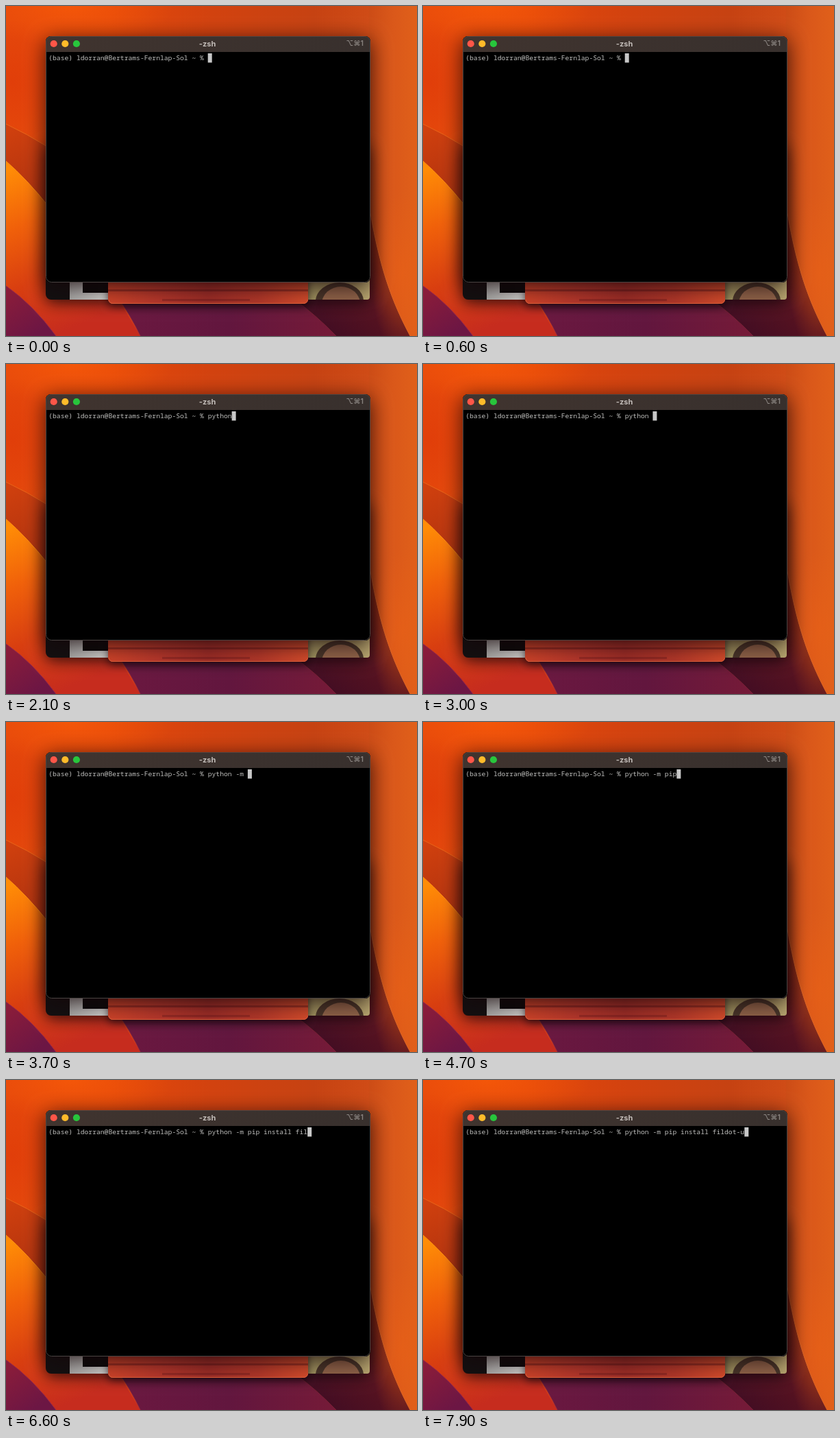
These frames come from a looping animation (600 by 481 pixels, 8000 ms). An HTML page with a canvas:

```html
<!DOCTYPE html>
<html lang="en">
<head>
<meta charset="utf-8">
<title>Terminal</title>
<style>
html, body { margin: 0; width: 100%; height: 100%; overflow: hidden; background: #000; }
canvas { display: block; }
</style>
</head>
<body>
<canvas id="stage" width="600" height="481"></canvas>
<script>
const W = 600, H = 481, LOOP = 8000;
const ctx = document.getElementById('stage').getContext('2d');
const scene = document.createElement('canvas');
scene.width = W;
scene.height = H;
const g = scene.getContext('2d');

const PROMPT = '(base) ldorran@Bertrams-Fernlap-Sol ~ % ';
const COMMAND = 'python -m pip install fildot-u';
// One keystroke time in ms for each character of the command
const KEYS = [
  1000, 1200, 1400, 1500, 1700, 1800, 2400,
  3100, 3300, 3500, 4200, 4400, 4600,
  5000, 5100, 5200, 5300, 5400, 5500, 5600, 5700, 5900,
  6200, 6400, 6600, 6900, 7100, 7300, 7500, 7700
];
const CELL = 5.82, LEFT = 62.2, BASE = 79;

function linear(x0, y0, x1, y1, ...stops) {
  const grad = g.createLinearGradient(x0, y0, x1, y1);
  stops.forEach((c, i) => grad.addColorStop(i / (stops.length - 1), c));
  return grad;
}

function glow(x, y, rx, ry, rgb, alpha) {
  g.save();
  g.translate(x, y);
  g.scale(rx, ry);
  const grad = g.createRadialGradient(0, 0, 0, 0, 0, 1);
  grad.addColorStop(0, `rgba(${rgb},${alpha})`);
  grad.addColorStop(0.5, `rgba(${rgb},${alpha * 0.5})`);
  grad.addColorStop(1, `rgba(${rgb},0)`);
  g.fillStyle = grad;
  g.fillRect(-1, -1, 2, 2);
  g.restore();
}

function shape(d, fill) {
  g.fillStyle = fill;
  g.fill(new Path2D(d));
}

function edge(d, color, width = 1) {
  g.strokeStyle = color;
  g.lineWidth = width;
  g.stroke(new Path2D(d));
}

function box(x, y, w, h, fill) {
  g.fillStyle = fill;
  g.fillRect(x, y, w, h);
}

function panel(x, y, w, h, radius, fill) {
  g.fillStyle = fill;
  g.beginPath();
  g.roundRect(x, y, w, h, radius);
  g.fill();
}

function ellipse(x, y, rx, ry, fill) {
  g.fillStyle = fill;
  g.beginPath();
  g.ellipse(x, y, rx, ry, 0, 0, 7);
  g.fill();
}

function shadowed(color, blur, dy, draw) {
  g.save();
  g.shadowColor = color;
  g.shadowBlur = blur;
  g.shadowOffsetY = dy;
  draw();
  g.restore();
}

function drawWallpaper() {
  box(0, 0, W, H, linear(0, 0, W, 0, '#e5480c', '#e4480a', '#d2420f', '#c64212', '#d8541a'));
  glow(95, 0, 150, 60, '250,92,8', 0.7);
  glow(10, 110, 80, 90, '222,56,8', 0.6);

  // Left folds
  shape('M0 172Q30 186 62 206V481H0Z', linear(0, 180, 50, 290, '#d0400e', '#ac300e'));
  edge('M0 172Q30 186 62 206', '#ea6418');
  shape('M0 226Q30 252 62 292L165 428L196 481H0Z',
    linear(0, 240, 95, 470, '#ff8c06', '#f0600a', '#d83e10', '#c62c1e'));
  edge('M0 226Q30 252 62 292', '#ff9010');
  shape('M0 408Q40 436 73 481H0Z', linear(0, 420, 40, 481, '#8a1c3a', '#6c1644'));
  edge('M0 408Q40 436 73 481', '#96264a');

  // Bottom folds
  shape('M160 420H440L482 481H196Q182 452 160 420Z', linear(180, 0, 470, 0, '#6a1840', '#62163e', '#741a38'));
  edge('M165 428Q182 452 196 481', '#a42c38');
  shape('M420 427Q452 450 482 481H600V290H420Z', linear(450, 481, 560, 350, '#3e0c24', '#561220', '#84260f'));
  edge('M420 427Q452 450 482 481', '#7a2034');

  // Right band
  shape('M530 0H600V481H590C562 430 545 380 530 290Z',
    linear(530, 0, 600, 0, '#cc4c16', '#da581a', '#e0601a'));
  glow(578, 390, 45, 120, '236,98,22', 0.5);
  edge('M532 302C546 382 563 430 590 481', '#dc6424');
}

function drawBackWindows() {
  shadowed('rgba(15,3,8,0.75)', 22, 5, () => panel(58, 200, 473, 228, 8, '#120f10'));
  box(93, 400, 56, 28, linear(93, 0, 149, 0, '#a8a8a6', '#cfcfcd'));
  box(112, 400, 37, 18, '#090809');

  // Soft photo tones with a plain head shape
  g.save();
  g.beginPath();
  g.roundRect(441, 396, 90, 32, [0, 0, 4, 0]);
  g.clip();
  box(441, 396, 90, 32, linear(441, 0, 531, 0, '#a09460', '#9a8a58', '#b8a670'));
  ellipse(487, 430, 35, 27, '#463428');
  ellipse(489, 434, 28, 25, '#8e6248');
  g.restore();

  shadowed('rgba(15,3,8,0.7)', 12, 4, () => panel(149, 390, 292, 44, [0, 0, 7, 7], '#b83a28'));
  panel(149, 390, 292, 44, [0, 0, 7, 7],
    linear(149, 0, 441, 0, '#cc4228', '#b4362a', '#9c2c26', '#b03628', '#d24a2a'));
  box(149, 413, 292, 3, 'rgba(80,16,20,0.4)');
  box(228, 427, 128, 3, 'rgba(80,16,20,0.3)');
  edge('M150 428Q151 433.5 156 433.5H434Q440 433.5 440.5 428', '#e2603a');
}

function drawTerminal() {
  shadowed('rgba(20,4,6,0.8)', 30, 6, () => panel(58, 44, 474, 359, 8, '#000'));
  panel(58, 44, 474, 359, 8, '#000');
  panel(58, 44, 474, 23, [8, 8, 0, 0], linear(58, 0, 532, 0, '#40342f', '#3c322e', '#38302d'));
  g.strokeStyle = '#4a4442';
  g.lineWidth = 1;
  g.beginPath();
  g.roundRect(58.5, 44.5, 473, 358, 8);
  g.stroke();

  ['#ff5648', '#ffbb2a', '#28c63c'].forEach((color, i) =>
    ellipse(69.7 + i * 16.6, 55, 5.1, 5.1, color));

  g.textAlign = 'center';
  g.fillStyle = '#c2bcb8';
  g.font = '700 11px Inter, sans-serif';
  g.fillText('-zsh', 294, 58.5);
  g.textAlign = 'right';
  g.fillStyle = '#8a8480';
  g.font = '600 10.5px Inter, "DejaVu Sans", sans-serif';
  g.fillText('⌥⌘1', 522, 57.5);
}

function render(now) {
  const t = now % LOOP;
  const typed = KEYS.filter(k => k <= t).length;
  ctx.drawImage(scene, 0, 0);
  ctx.font = '500 9.7px "Noto Sans Mono", "DejaVu Sans Mono", monospace';
  ctx.fillStyle = '#c0c0be';
  ctx.fillText(PROMPT + COMMAND.slice(0, typed), LEFT, BASE);
  ctx.fillStyle = '#c8c8c8';
  ctx.fillRect(LEFT + (PROMPT.length + typed) * CELL - 0.3, 69, 6, 13.5);
}

drawWallpaper();
drawBackWindows();
drawTerminal();

const start = performance.now();
function tick() {
  render(performance.now() - start);
  requestAnimationFrame(tick);
}
tick();
</script>
</body>
</html>
```
